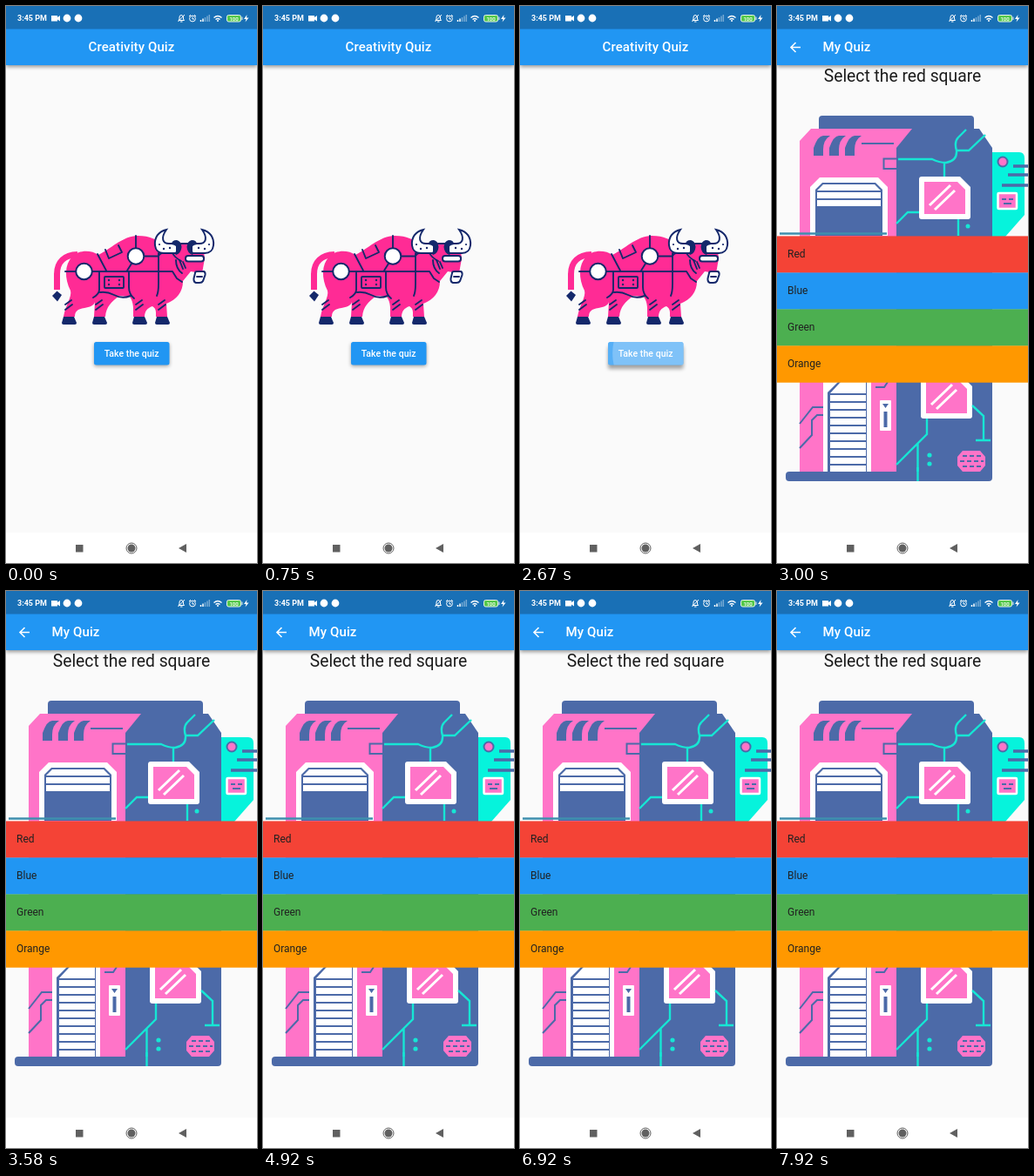
Animation, 288 px wide and 640 px high, one loop 8 s. Source, as an HTML page:

```html
<!DOCTYPE html>
<html lang="en">
<head>
<meta charset="utf-8">
<title>Creativity Quiz</title>
<style>
html, body { margin: 0; width: 100%; height: 100%; overflow: hidden; background: #fafafa }
svg { display: block; width: 100vw; height: 100vh; font-family: Roboto, sans-serif }
.n { fill: none; stroke: #14286b; stroke-width: 1.9; stroke-linecap: round; stroke-linejoin: round }
.w { fill: #fff }
.wn { fill: #fff; stroke: #14286b; stroke-width: 2 }
.navy { fill: #14286b }
.pink { fill: #ff2b95 }
.rose { fill: #ff74c8 }
.blue { fill: #4c6aa8 }
.bl { fill: none; stroke: #4c6aa8; stroke-width: 2 }
.teal { fill: none; stroke: #16e6d4; stroke-width: 2.4 }
.title { fill: #fff; font-size: 15px; font-weight: 500; letter-spacing: .11px }
</style>
</head>
<body>
<svg viewBox="0 0 288 640" preserveAspectRatio="none">
<defs>
  <filter id="soft" x="-20%" y="-50%" width="140%" height="220%"><feGaussianBlur stdDeviation="2"/></filter>
  <clipPath id="btnClip"><rect x="101" y="386" width="86.500" height="26.500" rx="2.500"/></clipPath>
  <g id="bar">
    <rect y="28" width="288" height="42" fill="#000" opacity=".4" filter="url(#soft)"/>
    <rect y="26" width="288" height="42" fill="#2196f3"/>
    <rect width="288" height="26.500" fill="#1970b6"/>
  </g>
  <g id="hoof"><path class="navy" d="M1 0H13L16 7Q16 9 14 9H1Q-1 9-1 7Z"/><path class="n" d="M3-14L10-19M3-8L11-14"/></g>
</defs>

<g id="home">
  <rect width="288" height="640" fill="#fafafa"/>
  <use href="#bar"/>
  <text class="title" x="144" y="52.300" text-anchor="middle">Creativity Quiz</text>

  <path d="M58.500 326V308C58.500 294 67 286 82 285.500" fill="none" stroke="#ff2b95" stroke-width="7"/>
  <path class="pink" d="M106 286C98 280 83 280 76 288C67 297 67 313 74 327C76 334 68 344 66 357H79C79 351 82 348 90 347C96 346 101 344 102 340L101 357H114C115 345 121 340 130 333L142 334C147 341 146 349 146 357H159C159 351 162 347 168 345C173 348 172 353 172 357H185L184 342C196 337 203 329 203 316L212 305L225 307L228 290C227 279 224 272 216 272H180C172 269 166 264 151 264C134 264 119 280 106 286Z"/>
  <path class="navy" d="M53 333L58.500 327.500L64 332L59 339.500Z"/>
  <use href="#hoof" x="65" y="357"/><use href="#hoof" x="100" y="357"/>
  <use href="#hoof" x="146" y="357"/><use href="#hoof" x="172" y="357"/>
  <g class="n">
    <path d="M68 305H191L196 313L202 317M105 285L115 304M107 305V326Q107 331 100 335M108 329Q116 328 124 332Q133 337 143 333M141 305V323Q141 331 147 336M144 296L139 304M149 264V278M158 287.500H175M175 284V319Q175 329 173 333M175 287Q178 282 190 282Q193 289 201 293M114 280L118 290L133 283L129 275"/>
    <path d="M195 292Q195 302 202 307M199 292L203 302M203 294L206 301"/>
    <rect x="113" y="311" width="22" height="13" rx="1"/>
  </g>
  <g class="navy"><circle cx="118" cy="315" r="1.200"/><circle cx="130" cy="315" r="1.200"/><circle cx="118" cy="320" r="1.200"/><circle cx="130" cy="320" r="1.200"/></g>
  <circle class="wn" cx="89.500" cy="305" r="9.300"/><circle class="wn" cx="149" cy="287.500" r="9.300"/>
  <g id="horn">
    <path class="wn" d="M184 257C175 259 170 266 171 275Q172 284 181 284H196V273H187C180 273 177 267 184 257Z"/>
    <path class="navy" d="M190 274Q190 269 196 269Q201 270 201.500 277Q201 284 195 286Q193 284 196 280Q197 275 190 274Z"/>
    <g class="navy"><circle cx="176" cy="274" r="1.100"/><circle cx="181" cy="279" r="1.200"/><circle cx="188" cy="278" r="1.200"/></g>
  </g>
  <use href="#horn" transform="translate(409 0) scale(-1 1)"/>
  <path class="n" d="M201 273H209"/>
  <rect class="wn" x="206" y="287" width="21" height="6.500" rx="3"/>
  <path class="wn" d="M219 305H227Q229 306 228.500 309L226 316Q225 318 222 318H218Q215 317 215.500 313L217 307Q217 305 219 305Z"/>
  <path class="n" d="M219 311H225"/>

  <rect id="shade" x="101" y="388" width="86.500" height="26" rx="2" opacity=".35" filter="url(#soft)"/>
  <g clip-path="url(#btnClip)">
    <rect x="101" y="386" width="87" height="27" fill="#2196f3"/>
    <rect id="glow" x="101" y="386" width="87" height="27" fill="#fff"/>
    <circle id="ripple" cx="166" cy="399" fill="#fff" opacity=".24"/>
  </g>
  <text x="144.200" y="403" text-anchor="middle" fill="#fff" font-size="10.500" font-weight="500" letter-spacing=".07">Take the quiz</text>
</g>

<g id="quiz">
  <rect width="288" height="640" fill="#fafafa"/>
  <g id="factory">
    <path d="M247 168H278Q284 168 284 175V240L262 265H247Z" fill="#06f3dc"/>
    <path class="bl" d="M271 184H288M265 194H288M258 206H288" style="stroke-width:3.500"/>
    <circle cx="259" cy="179" r="5.500" class="rose" stroke="#4c6aa8" stroke-width="2"/>
    <rect x="253.500" y="215" width="21.500" height="18" rx="1" class="rose" stroke="#fff" stroke-width="2.500"/>
    <path class="bl" d="M258 222H263M266 222H271M260 227H269"/>
    <rect class="blue" x="48" y="126" width="178" height="24" rx="4"/>
    <path class="rose" d="M26 536V155L39 141H156L138 163V536Z"/>
    <path class="blue" d="M155 141H232L247 163V540H137V163Z"/>
    <path id="slot" class="blue" d="M42 172V163Q47 149 53 149H61Q53 154 53 165V172Z"/>
    <use href="#slot" x="18"/><use href="#slot" x="36"/>
    <path class="bl" d="M97 158H134M122.500 175.500H139V187H122.500Z"/>
    <path class="w" d="M38 264V208L49 197H116L127 208V264Z"/>
    <path class="blue" d="M44 264V211L52 203H113L121 211V264Z"/>
    <path class="w" d="M46 212L53 205H112L119 212ZM46 214H119V221H46ZM46 223H119V230H46Z"/>
    <path d="M3 261.500H126" stroke="#3f8fae" stroke-width="2.500"/>
    <path class="teal" d="M139 176H178Q186 180 194 180Q207 178 206 166Q203 156 208 151L217 142M239 148L220 166H206M192 180V197M137 250L150 237H165M208 264V245"/>
    <circle cx="219" cy="253" r="2.500" fill="#16e6d4"/>
    <g id="pane">
      <path class="w" d="M166 196H210L222 208V242Q222 245 219 245H166Q163 245 163 242V199Q163 196 166 196Z"/>
      <path class="rose" d="M169 202H207L216 211V239H169Z"/>
      <path d="M175 229L199 206M181 234L204 212" stroke="#fff" stroke-width="3"/>
    </g>
    <use href="#pane" x="2" y="229"/>
    <path class="w" d="M53 420H108V536H53Z"/>
    <path class="blue" d="M58 536V444L72 430H103V536Z"/>
    <path class="w" d="M61 445L73 432H102V445Z"/>
    <g id="slats" class="w"></g>
    <path class="bl" d="M53 461H41L26 480M53 470H46L40 476V493L26 508M113 438H123L127 432"/>
    <rect class="w" x="118" y="453" width="13" height="35" rx="1"/>
    <path class="blue" d="M121 457H128L124.500 462ZM122.500 466H126.500V484H122.500Z"/>
    <path class="teal" d="M172 474V492L137 527M161.500 503V546M224 459L237 471V499M228 499H245"/>
    <g fill="#16e6d4"><circle cx="175" cy="516" r="2.600"/><circle cx="175" cy="526" r="2.600"/></g>
    <path class="rose" d="M213 511H233L239 518V528L233 535H213L207 528V518Z"/>
    <path class="bl" stroke-dasharray="5 3" d="M213 517H234M210 523H237M213 529H234"/>
    <rect class="blue" x="10" y="535" width="237" height="11" rx="4"/>
    <path class="teal" d="M161.500 530V546"/>
  </g>
  <g id="list"></g>
  <use href="#bar"/>
  <path d="M27 47.500H16M21.500 42L16 47.500L21.500 53" fill="none" stroke="#fff" stroke-width="1.600"/>
  <text class="title" x="52.500" y="52.300">My Quiz</text>
  <text x="144" y="86.500" text-anchor="middle" fill="#1c1c1c" font-size="19.300">Select the red square</text>
</g>

<g id="system">
  <g fill="#fff">
    <text x="13" y="17.400" font-size="9" font-weight="700">3:45 PM</text>
    <path d="M52 11H59V13L62 11V17.500L59 15.500V17.500H52Z"/>
    <circle cx="70" cy="14" r="4.400"/><circle cx="83" cy="14" r="4.400"/>
    <path d="M276.500 10L273 15H275.500L274.500 18.500L278.500 13.500H276Z"/>
  </g>
  <g fill="none" stroke="#fff">
    <path d="M198 16.500H204.500L203.500 15V12.500Q203 10.500 201 10.500Q199 10.500 199 13V15ZM200 18H202.500M205 10L197.500 18"/>
    <circle cx="214" cy="14.500" r="3.400"/><path d="M214 12.500V15H216M210 12L212 10M218 12L216 10"/>
    <path d="M223.500 18V16M226 18V14.500" stroke-width="1.500"/>
    <path d="M228.500 18V13M231 18V11.500M233.300 18V10" stroke-width="1.500" opacity=".4"/>
    <path d="M238.500 13.500Q243 9.500 247.500 13.500M240.500 15.500Q243 13.500 245.500 15.500" stroke-width="1.400"/>
    <path d="M242 17H244" stroke-width="1.600"/>
  </g>
  <rect x="253.500" y="10.500" width="16" height="7.500" rx="2" fill="#55c94b" stroke="#e8f5e9"/>
  <path d="M271 12.500V16" stroke="#e8f5e9"/>
  <text x="261.500" y="16.600" text-anchor="middle" fill="#fff" font-size="6" font-weight="500">100</text>
  <rect y="605" width="288" height="35" fill="#fff"/>
  <g fill="#606060">
    <rect x="80" y="619" width="8.500" height="8.500"/>
    <circle cx="144" cy="623" r="4.500"/>
    <circle cx="144" cy="623" r="6" fill="none" stroke="#606060"/>
    <path d="M198 623L207 618V628Z"/>
  </g>
</g>
</svg>
<script>
const $ = id => document.getElementById(id);
const set = (id, attrs) => Object.entries(attrs).forEach(([k, v]) => $(id).setAttribute(k, v));
const ramp = (t, from, length) => Math.max(0, Math.min(1, (t - from) / length));

const answers = { Red: '#f44336', Blue: '#2196f3', Green: '#4caf50', Orange: '#ff9800' };
$('list').innerHTML = Object.entries(answers).map(([name, color], i) =>
  `<rect y="${264.4 + i * 42}" width="288" height="42.3" fill="${color}"/>
   <text x="12" y="${289.4 + i * 42}" font-size="12" fill="#212121">${name}</text>`).join('');
$('slats').innerHTML = Array.from({ length: 10 }, (_, i) =>
  `<rect x="61" y="${447 + i * 9}" width="41" height="7"/>`).join('');

const LOOP = 8000, STEP = 1000 / 12, PRESS = 2480, OPEN = 2700;

function draw(now) {
  const t = Math.floor((now % LOOP) / STEP + 0.01) * STEP;
  const press = ramp(t, PRESS, 150);
  set('glow', { opacity: 0.24 * press });
  set('ripple', { r: 60 * ramp(t, PRESS, 187) + 70 * ramp(t, PRESS + 187, 150) });
  set('shade', { transform: `translate(0 ${3 * press})` });

  const open = ramp(t, OPEN, 300);
  set('quiz', {
    opacity: open * (0.4 + 0.6 * open),
    transform: `translate(0 ${160 * (1 - open) ** 3})`
  });
  requestAnimationFrame(draw);
}
draw(0);
</script>
</body>
</html>
```
